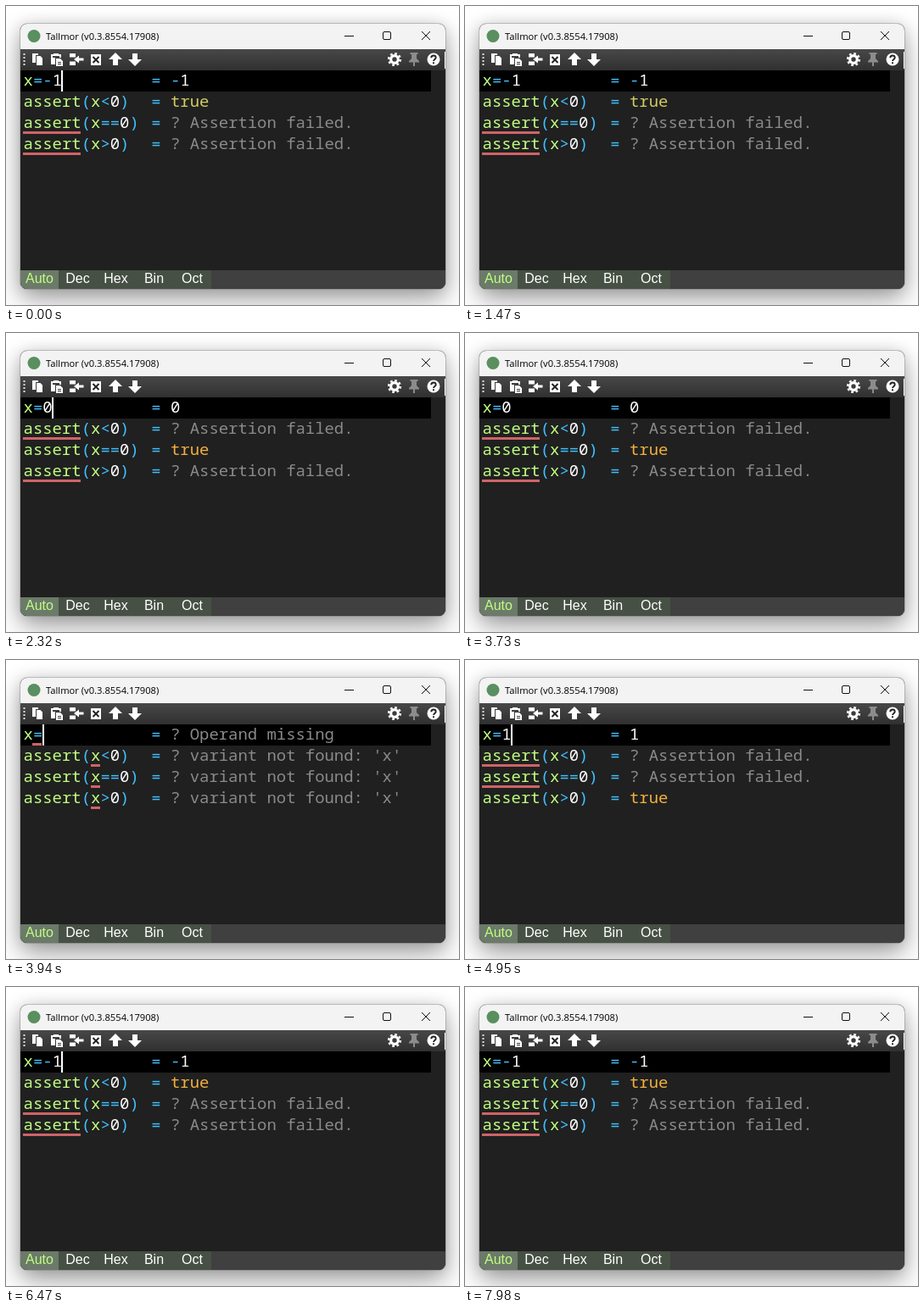
These frames come from a looping animation (534 px wide and 353 px high, 8 s). An HTML page:

```html
<!DOCTYPE html>
<html lang="en">
<head>
<meta charset="utf-8">
<title>Calculator</title>
<style>
  html, body { margin: 0; width: 100%; height: 100%; overflow: hidden; background: #fff; }
  #window {
    position: absolute; left: 17px; top: 21px; width: 501px; height: 313px;
    border-radius: 8px; background: #202020;
    box-shadow: 0 0 0 1px rgba(110, 110, 110, .35), 0 14px 32px rgba(0, 0, 0, .32), 0 2px 18px rgba(0, 0, 0, .18);
  }
  svg { position: absolute; left: 0; top: 0; display: block; }
  .title { font: 11.2px "Open Sans", "Noto Sans", sans-serif; fill: #000; }
  .tabs { font: 16px "Liberation Sans", Arial, sans-serif; text-anchor: middle; fill: #fff; }
  #sheet { font: 500 18.92px "Noto Sans Mono", monospace; }
  #sheet text { white-space: pre; }
</style>
</head>
<body>
<div id="window"></div>
<svg width="534" height="353" viewBox="0 0 534 353">
  <defs>
    <clipPath id="frame"><rect x="17" y="21" width="501" height="313" rx="8"/></clipPath>
    <linearGradient id="bar" x2="0" y2="1">
      <stop stop-color="#484848"/><stop offset="1" stop-color="#303030"/>
    </linearGradient>
    <path id="arrow" d="M0-8 8 0H3V7H-3V0H-8Z"/>
  </defs>

  <g clip-path="url(#frame)">
    <rect x="17" y="21" width="501" height="30" fill="#f3f3f3"/>
    <rect x="17" y="51" width="501" height="25" fill="url(#bar)"/>
    <rect x="17" y="76" width="484" height="25"/>
    <rect x="17" y="312" width="501" height="22" fill="#404040"/>
    <rect x="17" y="312" width="225" height="22" fill="#465044"/>
    <rect x="17" y="312" width="45" height="22" fill="#6b7a69"/>
  </g>

  <circle cx="33" cy="35.5" r="7.5" fill="#5a8f60"/>
  <text class="title" x="47" y="39.5">Tallmor (v0.3.8554.17908)</text>
  <path d="M399 35.5h11M444.5 32q0-1.5 1.5-1.5h6q1.5 0 1.5 1.5v6q0 1.5-1.5 1.5h-6q-1.5 0-1.5-1.5zM490 30l10 10m0-10l-10 10" fill="none" stroke="#111"/>

  <g fill="#fff">
    <path d="M20.5 56h2v2h-2zm0 4h2v2h-2zm0 4h2v2h-2zm0 4h2v2h-2z" fill="#ddd"/>
    <path d="M31 56h7v2h-3v9h-4zM36 59h4.5l2.500 2.500V70h-7z"/>
    <path d="M53 57h3v-1h6v1h3v4h-2v-2h-8v2h3v8h-5zM59 62h5l3 3v6h-8zm2 4v1h4v-1zm0 2v1h4v-1z" fill-rule="evenodd"/>
    <path d="M75 56h7v4.500h-7zM75 65.500h7v4.500h-7zM80 63l6-4.500v3h5.500v3h-5.500v3z"/>
    <path d="M100 57h12v13h-12z"/>
    <path d="M102.500 60l7 7m0-7l-7 7" stroke="#222" stroke-width="2"/>
    <use href="#arrow" x="129" y="63"/>
    <use href="#arrow" transform="translate(152 63) scale(1 -1)"/>
    <g fill="none" stroke="#fff">
      <circle cx="458" cy="63" r="4.3" stroke-width="3.2"/>
      <circle cx="458" cy="63" r="6.8" stroke-width="2.6" stroke-dasharray="2.67 2.67"/>
    </g>
    <path d="M476.5 55h9v2h-1.5v5l3 3v1.500h-5V71h-2v-4.500h-5V65l3-3v-5h-1.500z" fill="#8c8c8c"/>
    <circle cx="504" cy="63" r="7.5"/>
    <path d="M501.3 61.2q0-2.7 2.7-2.7t2.7 2.4c0 2-2.7 2-2.7 4.1m0 1.3v2" fill="none" stroke="#222" stroke-width="1.9"/>
    <rect x="517" y="54" width="1" height="20"/>
  </g>

  <g id="sheet"></g>
  <g class="tabs">
    <text x="39.5" y="327" fill="#c0ff80">Auto</text>
    <text x="84.5" y="327">Dec</text>
    <text x="129.5" y="327">Hex</text>
    <text x="174.5" y="327">Bin</text>
    <text x="219.5" y="327">Oct</text>
  </g>
</svg>
<script>
const LOOP = 8000, TOP = 76, ROW = 25, CHAR = 11.35, LEFT = 20.58, EQUALS = 171.2, RESULT = 194;
const GREEN = '#c0ff80', BLUE = '#40c0ff', WHITE = '#fff', GRAY = '#8a8a8a', RED = '#cf6468';

// Times at which the value after "x=" is edited, and at which the caret toggles.
const edits = [[0, '-1'], [2010, '-'], [2220, ''], [2320, '0'], [3940, ''],
               [3990, '1'], [6250, ''], [6350, '-'], [6470, '-1']];
const blinks = [500, 950, 1470, 2770, 3280, 3730, 4440, 4950, 5450, 5960, 6970, 7490, 7980];
const tests = [['<', x => x < 0], ['==', x => x === 0], ['>', x => x > 0]];
const sheet = document.getElementById('sheet');

const escapeText = s => s.replace(/</g, '&lt;').replace(/>/g, '&gt;');
const text = (x, row, s, fill) =>
  `<text x="${x}" y="${TOP + row * ROW + 18}" fill="${fill}">${escapeText(s)}</text>`;
const bar = (x, y, w, h, fill) =>
  `<rect x="${Math.floor(x)}" y="${y}" width="${w}" height="${h}" fill="${fill}"/>`;
const underline = (row, col, count) =>
  bar(LEFT + col * CHAR, TOP + row * ROW + 22, Math.round(count * CHAR), 3, RED);

function code(x, row, s, trueColor) {
  if (s[0] === '?') return text(x, row, s, GRAY);
  return [...s.matchAll(/[a-z]+|\d+|[^a-z\d]+/g)].map(({ 0: token, index }) => {
    const fill = token === 'true' ? trueColor
      : /[a-z]/.test(token) ? GREEN
      : /\d/.test(token) ? WHITE : BLUE;
    return text(x + index * CHAR, row, token, fill);
  }).join('');
}

function draw(value, caret, trueColor) {
  const valid = /\d/.test(value), input = 'x=' + value;
  const line = (row, expression, result) =>
    code(LEFT, row, expression) + text(EQUALS, row, '=', BLUE) + code(RESULT, row, result, trueColor);

  let out = line(0, input, valid ? value : '? Operand missing');
  if (!valid) out += underline(0, input.length - 1, 1);

  tests.forEach(([operator, check], i) => {
    const passed = valid && check(+value);
    const result = passed ? 'true' : valid ? '? Assertion failed.' : "? variant not found: 'x'";
    out += line(i + 1, `assert(x${operator}0)`, result);
    if (!valid) out += underline(i + 1, 7, 1);
    else if (!passed) out += underline(i + 1, 0, 6);
  });

  if (caret) out += bar(LEFT + input.length * CHAR, TOP, 2, ROW, WHITE);
  sheet.innerHTML = out;
}

let shown;
function tick() {
  const t = performance.now() % LOOP;
  const [start, value] = edits.filter(([at]) => at <= t).pop();
  const caret = blinks.filter(at => at > start && at <= t).length % 2 === 0;
  const key = start + ':' + caret;
  if (key !== shown) draw(value, caret, start === 0 ? '#d2cc62' : '#f2b03e');
  shown = key;
  requestAnimationFrame(tick);
}
tick();
</script>
</body>
</html>
```
